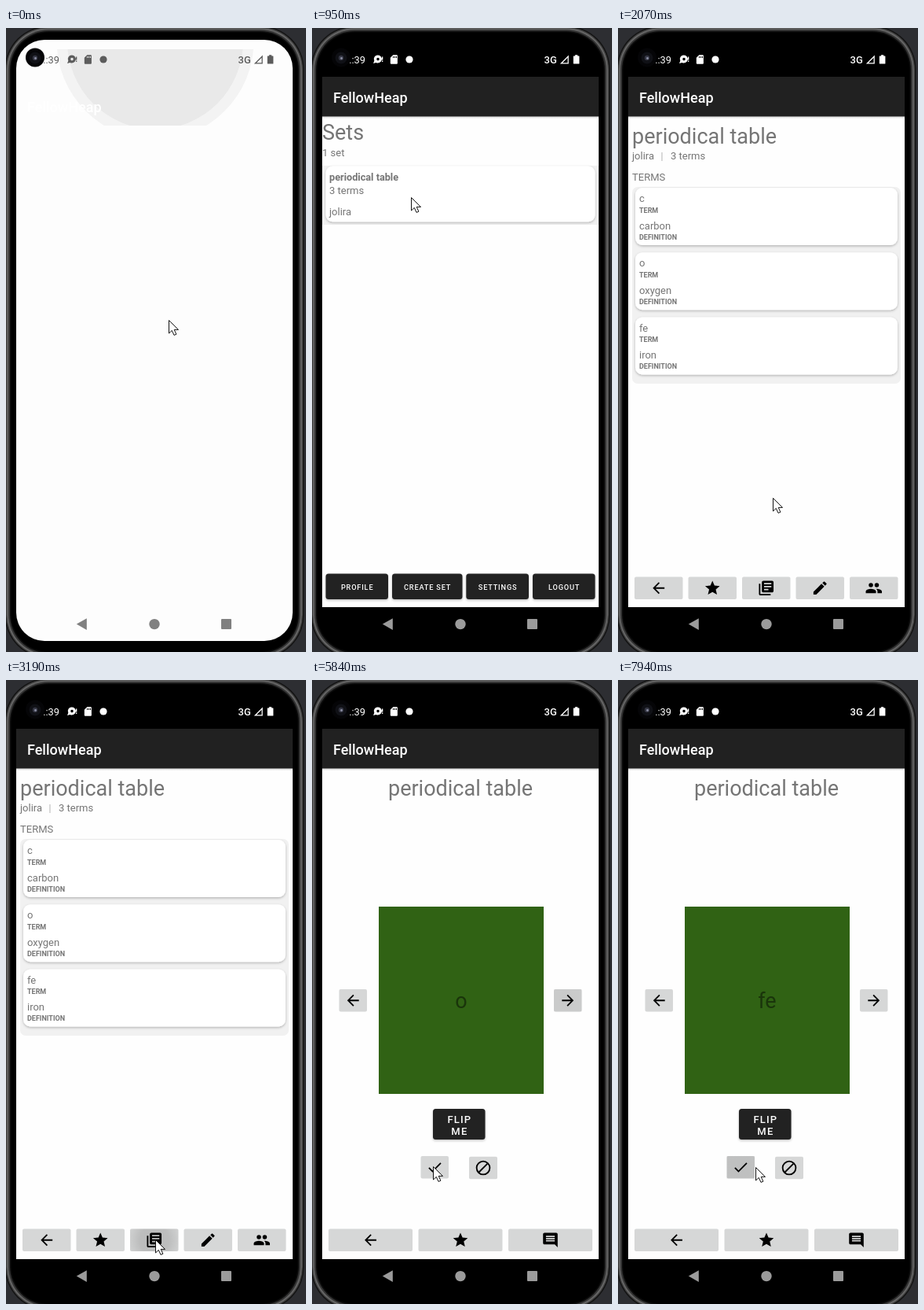
These frames come from a looping animation (382x793 px, 8 s). An HTML page:

```html
<!DOCTYPE html>
<html lang="en">
<head>
<meta charset="utf-8">
<title>Flashcards on a phone</title>
<style>
html, body { margin: 0; width: 100%; height: 100%; overflow: hidden; background: #2d2e32; }
svg { display: block; }
#stage { width: 382px; height: 793px; }
text { font-family: Roboto, sans-serif; white-space: pre; }
</style>
</head>
<body>
<svg id="stage" viewBox="0 0 382 793">
  <defs>
    <clipPath id="screen"><rect x="13" y="15" width="352" height="764" rx="36"/></clipPath>
    <clipPath id="band"><rect x="13" y="27" width="352" height="97"/></clipPath>
    <filter id="shade" x="-10%" y="-20%" width="120%" height="150%">
      <feDropShadow dx="0" dy="1.3" stdDeviation="1.7" flood-color="#000" flood-opacity=".27"/>
    </filter>
    <linearGradient id="fall" x2="0" y2="1">
      <stop stop-color="#000" stop-opacity=".15"/><stop offset="1" stop-color="#000" stop-opacity="0"/>
    </linearGradient>
    <radialGradient id="ripple">
      <stop/><stop offset=".5" stop-opacity=".9"/><stop offset="1" stop-opacity="0"/>
    </radialGradient>
  </defs>
  <g id="body"></g>
  <g clip-path="url(#screen)">
    <rect id="back" x="13" y="15" width="352" height="764"/>
    <g id="splash"></g>
    <g id="sets"></g>
    <g id="terms"></g>
    <g id="cards"></g>
    <g id="status"></g>
    <g id="nav"></g>
  </g>
  <g id="lens"></g>
  <path id="cursor" d="M0 0V16.5l3.8-3.6 2.7 6 2.9-1.2-2.7-5.8H12z" fill="#fff" stroke="#111" stroke-width="1"/>
</svg>
<script>
const $ = id => document.getElementById(id);
const APP = 'FellowHeap', OWNER = 'jolira', SET = 'periodical table';
const GREY = '#757575', DARK = '#212121', LOOP = 8000;

const ICONS = {
  back: 'M20 11H7.8l5.6-5.6L12 4l-8 8 8 8 1.4-1.4L7.8 13H20z',
  next: 'M4 11h12.2l-5.6-5.6L12 4l8 8-8 8-1.4-1.4 5.6-5.6H4z',
  star: 'M12 17.3 18.2 21l-1.6-7L22 9.2l-7.2-.6L12 2 9.2 8.6 2 9.2 7.5 14l-1.7 7z',
  study: 'M4 6H2v14c0 1.1.9 2 2 2h14v-2H4zM20 2H8c-1.1 0-2 .9-2 2v12c0 1.1.9 2 2 2h12c1.1 0 2-.9 2-2V4c0-1.1-.9-2-2-2zM19 11H9V9h10zM15 15H9v-2h6zM19 7H9V5h10z',
  edit: 'M3 17.2V21h3.8L17.8 9.9l-3.8-3.8zM20.7 7c.4-.4.4-1 0-1.4l-2.3-2.3c-.4-.4-1-.4-1.4 0l-1.8 1.8 3.8 3.8z',
  group: 'M16 11a3 3 0 1 0 0-6 3 3 0 0 0 0 6zM8 11a3 3 0 1 0 0-6 3 3 0 0 0 0 6zM8 13c-2.3 0-7 1.2-7 3.5V19h14v-2.5c0-2.3-4.7-3.5-7-3.5zM16 13c-.3 0-.6 0-1 .1 1.2.8 2 2 2 3.4V19h6v-2.5c0-2.3-4.7-3.5-7-3.5z',
  check: 'M9 16.2 4.8 12l-1.4 1.4L9 19 21 7l-1.4-1.4z',
  block: 'M12 2a10 10 0 1 0 0 20 10 10 0 0 0 0-20zM4 12a8 8 0 0 1 12.9-6.3L5.7 16.9A8 8 0 0 1 4 12zM12 20a8 8 0 0 1-4.9-1.7L18.3 7.1A8 8 0 0 1 12 20z',
  note: 'M22 4c0-1.1-.9-2-2-2H4c-1.1 0-2 .9-2 2v12c0 1.1.9 2 2 2h14l4 4zM18 14H6v-2h12zM18 11H6V9h12zM18 8H6V6h12z'
};

const rect = (x, y, w, h, fill, more = '') =>
  `<rect x="${x}" y="${y}" width="${w}" height="${h}" fill="${fill}" ${more}/>`;
const label = (s, x, y, size, fill = GREY, more = '') =>
  `<text x="${x}" y="${y}" font-size="${size}" fill="${fill}" ${more}>${s}</text>`;
const icon = (name, x, y) =>
  `<path transform="translate(${x} ${y}) scale(.93) translate(-12 -12)" fill-rule="evenodd" d="${ICONS[name]}"/>`;
const iconButton = (name, x, y, w, h, id) => rect(x, y, w, h, '#d6d7d7', 'rx="2"') +
  (id ? `<svg x="${x}" y="${y}" width="${w}" height="${h}"><circle id="${id}" cx="${w / 2}" cy="${h / 2}" fill="url(#ripple)" opacity="0"/></svg>` : '') +
  icon(name, x + w / 2, y + h / 2);
const darkButton = (x, y, w, h) => rect(x, y, w, h, DARK, 'rx="3.5" filter="url(#shade)"');
const caps = (s, x, y, size) => label(s, x + size * .045, y, size, '#fff',
  `font-weight="500" text-anchor="middle" letter-spacing="${size * .0893}"`);
const panel = (x, y, w, h) => rect(x, y, w, h, '#fff', 'rx="9" filter="url(#shade)"');
const page = content => rect(13, 62, 352, 674, '#fefefe') + content +
  rect(13, 112.5, 352, 3, 'url(#fall)') + rect(13, 62, 352, 50.5, DARK) +
  label(APP, 27, 94.5, 18, '#fff', 'font-weight="500"');

function buildBody() {
  // The case is taller than the stage, so its lower rim runs off the bottom
  const ring = (inset, rx, fill) =>
    rect(-1.5 + inset, -2.5 + inset, 381 - inset * 2, 803.5 - inset * 2, fill, `rx="${rx}"`);
  $('body').innerHTML = rect(0, 0, 382, 793, '#2d2e32') + ring(0, 55, '#141414') +
    ring(1.5, 54, '#444') + ring(3, 52, '#686868') + ring(4.5, 51, '#363636') +
    ring(6.5, 49, '#0c0c0c') + ring(8, 48, '#000');
  $('lens').innerHTML = '<circle cx="37" cy="37.5" r="12" fill="#050507"/>' +
    '<circle cx="37" cy="38" r="7.5" fill="#101116"/><circle cx="37" cy="38" r="3.2" fill="#343643"/>' +
    '<circle cx="37.5" cy="38.5" r="1.4" fill="#8d90a6"/>';
}

function buildBars() {
  $('status').innerHTML = '<text x="68" y="45" font-size="12.8" text-anchor="end">.:39</text>' +
    '<path fill-rule="evenodd" d="M84 34.5a5 5 0 1 1-2.5 9.4L78 45l1.3-3.2A5 5 0 0 1 84 34.5zm0 3.3a1.8 1.8 0 1 0 0 3.6 1.8 1.8 0 0 0 0-3.6z"/>' +
    '<path d="M89 36.5h1.3v4H89zM89 41.6h1.3v1.3H89z"/>' +
    '<path fill-rule="evenodd" d="M103.3 34.3h4.6q1 0 1 1v9.5q0 1-1 1h-7.1q-1 0-1-1v-7zM103 36h1v2h-1zM105 36h1v2h-1zM107 36h1v2h-1z"/>' +
    '<circle cx="124" cy="40" r="4.6"/>' +
    '<text x="295.5" y="45" font-size="13" font-weight="500">3G</text>' +
    '<path fill-rule="evenodd" d="M326.8 34.5v11h-11zm-1.3 3.2-6.5 6.5h6.5z"/>' +
    '<path d="M335 34.3h3.2v1.2h1.6q.6 0 .6.6v8.8q0 .6-.6.6h-6.4q-.6 0-.6-.6v-8.8q0-.6.6-.6h1.6z"/>';
  $('nav').innerHTML = '<path d="M89.8 757.6 102.8 750.2v14.8z"/>' +
    '<circle cx="189" cy="757.6" r="6.7"/><rect x="274" y="751" width="13" height="13" rx="1"/>';
  $('splash').innerHTML = '<g clip-path="url(#band)"><circle cx="190" cy="16.7" r="125.4" fill="#f3f3f3"/>' +
    '<circle cx="190" cy="16.7" r="112" fill="#e9e9e9"/></g>' +
    label(APP, 27, 106.5, 18, '#fff', 'font-weight="500"');
}

function buildPages() {
  const menu = [['PROFILE', 17.5, 79.5], ['CREATE SET', 102, 89.5], ['SETTINGS', 196.3, 79.7], ['LOGOUT', 281, 79.5]];
  $('sets').innerHTML = page(
    label('Sets', 13, 141.6, 27) +
    '<g id="list">' + label('1 set', 13, 163, 13) + rect(13, 175, 352, 75, '#f1f1f1') + panel(17.5, 175.3, 343, 71) +
    label(SET, 22, 193.8, 12.7, GREY, 'font-weight="700"') + label('3 terms', 22, 211, 13) +
    label(OWNER, 22, 237.5, 13) + '</g>' +
    menu.map(([s, x, w]) => darkButton(x, 693.5, w, 32.5) + caps(s, x + w / 2, 713.8, 9.2)).join(''));

  const pairs = [['c', 'carbon'], ['o', 'oxygen'], ['fe', 'iron']];
  const tools = ['back', 'star', 'study', 'edit', 'group'];
  $('terms').innerHTML = page(
    label(SET, 18, 146.5, 27) + label(OWNER, 18, 167.3, 13) + label('|', 54.5, 167, 12, '#aaa') +
    label('3 terms', 67, 167.3, 13) + label('TERMS', 18, 194.3, 13) +
    rect(18, 202, 342, 250, '#f1f1f1', 'rx="7"') +
    pairs.map(([term, text], i) => `<g transform="translate(0 ${i * 82.2})">` + panel(22, 203, 334, 73) +
      label(term, 27, 221.3, 13) + label('TERM', 27, 234.5, 9, GREY, 'font-weight="700"') +
      label(text, 27, 255.5, 13) + label('DEFINITION', 27, 268.9, 9, GREY, 'font-weight="700"') + '</g>').join('') +
    tools.map((name, i) => iconButton(name, 21 + i * 68.5, 697.5, 61.5, 28.5, name === 'study' && 'studyTap')).join(''));

  $('cards').innerHTML = page(
    label(SET, 189, 146.5, 27, GREY, 'text-anchor="middle"') + rect(85, 288, 210, 238, '#306214') +
    label('c', 190, 417.3, 27, '#1a350b', 'id="face" text-anchor="middle"') +
    iconButton('back', 34.5, 393, 35.5, 28.5) + iconButton('next', 308, 393, 35.5, 28.5, 'nextTap') +
    darkButton(154, 545, 66.5, 39) + caps('FLIP', 187.3, 562.6, 13) + caps('ME', 187.3, 577.5, 13) +
    iconButton('check', 138.5, 605, 35.5, 28.5, 'checkTap') + iconButton('block', 200, 605.8, 36, 28.5) +
    ['back', 'star', 'note'].map((name, i) => iconButton(name, 21 + i * 114.5, 697.5, 107, 28.5)).join(''));
}

// The picture is refreshed in bursts: [first, last, count]
const beats = [0];
[[130, 280, 2], [560, 950, 4], [1390, 2340, 8], [2490, 3460, 8], [3610, 4540, 8], [4780, 5680, 8],
 [5840, 5840, 1], [6130, 7120, 9], [7240, 7660, 4], [7940, 7940, 1]].forEach(([a, b, n]) => {
  for (let i = 0; i < n; i++) beats.push(Math.floor((a + (n > 1 ? i * (b - a) / (n - 1) : 0)) / 10) * 10);
});

// Pointer stops: [time, x, y]
const route = [
  [0, 207, 371], [430, 207, 371], [950, 126, 215], [1790, 126, 215], [2060, 197, 597], [2340, 194, 685],
  [2760, 190, 711], [3610, 190, 711], [4000, 178, 654], [4400, 158, 620], [4900, 158, 620],
  [5160, 325, 409], [5420, 325, 409], [5680, 180, 600], [5840, 154, 618], [6250, 154, 618],
  [6490, 323, 409], [6740, 323, 409], [7120, 156, 619], [7380, 156, 619], [7660, 159, 626], [7940, 175, 619]
];

// Taps: [time, length, lasting shade, end of lasting shade]
const taps = {
  studyTap: [[3030, 600, 0, 0]],
  checkTap: [[4780, 600, 0, 0], [6130, 450, 0, 0], [7240, 450, .11, LOOP]],
  nextTap: [[5160, 450, .06, 6130], [6490, 480, 0, 0]]
};

const clamp = v => Math.max(0, Math.min(1, v));
const mix = (a, b, k) => a + (b - a) * k;
const ease = k => k * k * (3 - 2 * k);
const show = (id, on) => $(id).style.display = on ? '' : 'none';

function pointer(t) {
  const i = route.findIndex(p => p[0] > t);
  if (i < 0) return route[route.length - 1].slice(1);
  const a = route[i - 1], b = route[i], k = ease((t - a[0]) / (b[0] - a[0]));
  return [mix(a[1], b[1], k), mix(a[2], b[2], k)];
}

function drawTap(id, t) {
  let r = 0, shade = 0;
  for (const [start, length, rest, end] of taps[id]) {
    const k = (t - start) / length;
    if (k >= 0 && k < 1) { r = 20 + 70 * k; shade = Math.max(rest, .14 * (1 - k * k)); }
    else if (k >= 1 && t < end) { r = 80; shade = rest; }
  }
  $(id).setAttribute('r', r);
  $(id).setAttribute('opacity', shade);
}

function place(id, scale, alpha) {
  show(id, alpha > 0);
  $(id).setAttribute('transform', `translate(189 399) scale(${scale}) translate(-189 -399)`);
  $(id).setAttribute('opacity', alpha);
}

function draw(time) {
  const t = beats.filter(b => b <= time).pop();
  const open = t >= 130, first = clamp((t - 1560) / 330), second = clamp((t - 3260) / 310);
  const enter = k => mix(.85, 1, 1 - (1 - k) ** 3), fade = k => clamp((k - .1) * 2);

  $('back').setAttribute('fill', open ? '#000' : '#fdfdfd');
  show('splash', !open);
  show('list', t >= 280);
  place('sets', 1 + .06 * first, open && first < 1 ? 1 : 0);
  place('terms', first < 1 ? enter(first) : 1 + .065 * second, second < 1 ? fade(first) : 0);
  place('cards', enter(second), fade(second));

  const lit = clamp((t - 430) / 520), tone = (a, b) => `rgb(${Array(3).fill(Math.round(mix(a, b, lit)))})`;
  $('status').setAttribute('fill', tone(92, 255));
  $('nav').setAttribute('fill', tone(128, 155));

  $('face').textContent = t < 5290 ? 'c' : t < 6620 ? 'o' : 'fe';
  Object.keys(taps).forEach(id => drawTap(id, t));
  $('cursor').setAttribute('transform', `translate(${pointer(t).map(v => Math.round(v) + .5)})`);
}

buildBody();
buildBars();
buildPages();
const begin = performance.now();
function tick() {
  draw((performance.now() - begin) % LOOP);
  requestAnimationFrame(tick);
}
tick();
</script>
</body>
</html>
```
